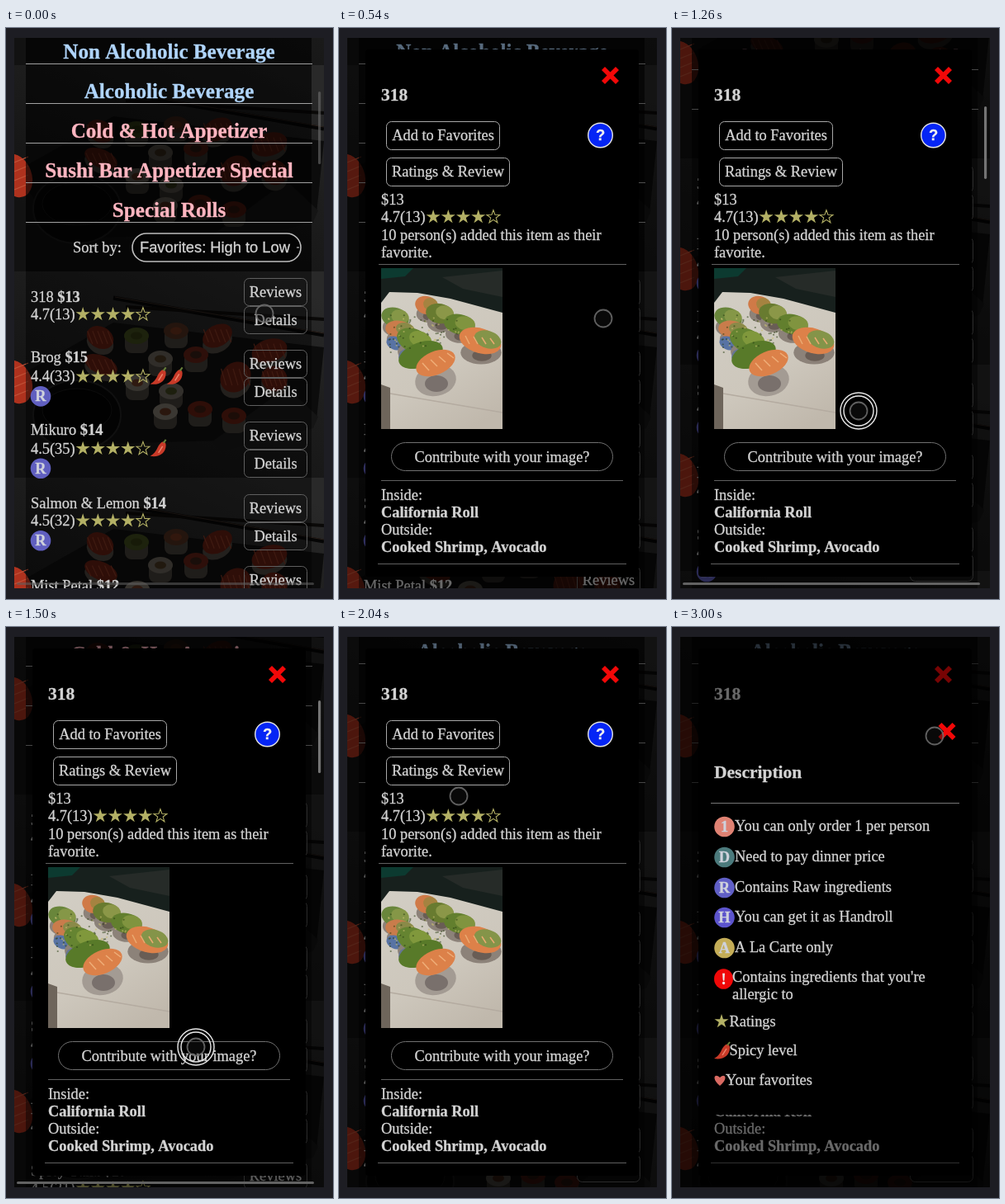
Animation of 396x692 px, one loop 3060 ms. Source, as an HTML page with a canvas:

```html
<!DOCTYPE html>
<html lang="en">
<head>
<meta charset="utf-8">
<title>Menu</title>
<style>
html, body { margin: 0; width: 100%; height: 100%; overflow: hidden; background: #1d1d23; }
canvas { display: block; width: 396px; height: 692px; }
</style>
</head>
<body>
<canvas id="stage"></canvas>
<script>
const W = 396, H = 692, LOOP = 3060, STEP = 60;
const SERIF = '"Liberation Serif", "Times New Roman", serif';
const SANS = '"Liberation Sans", Arial, sans-serif';
const GREY = '#d3d3d3', GOLD = '#b3b065';

const canvas = document.getElementById('stage');
const dpr = window.devicePixelRatio || 1;
canvas.width = W * dpr;
canvas.height = H * dpr;
let ctx = canvas.getContext('2d');

const sections = ['Non Alcoholic Beverage', 'Alcoholic Beverage', 'Cold & Hot Appetizer',
  'Sushi Bar Appetizer Special', 'Special Rolls'];
const items = [
  { name: '318', price: 13, rating: '4.7(13)' },
  { name: 'Brog', price: 15, rating: '4.4(33)', hot: 2, raw: true },
  { name: 'Mikuro', price: 14, rating: '4.5(35)', hot: 1, raw: true },
  { name: 'Salmon & Lemon', price: 14, rating: '4.5(32)', raw: true },
  { name: 'Mist Petal', price: 12, rating: '4.6(28)' },
  { name: 'Spicy Tuna', price: 13, rating: '4.5(21)', raw: true }
];
const legend = [
  ['1', '#df8273', 241, 'You can only order 1 per person'],
  ['D', '#4b7a7c', 278, 'Need to pay dinner price'],
  ['R', '#605fc6', 315, 'Contains Raw ingredients'],
  ['H', '#5c54cc', 351, 'You can get it as Handroll'],
  ['A', '#c4ad57', 388, 'A La Carte only']
];

// time, x, y
const path = [[0, 313, 346], [240, 313, 347], [540, 320, 352], [660, 318, 362], [1080, 228, 600],
  [1260, 226, 464], [1380, 226, 464], [1620, 234, 554], [1740, 236, 535], [2040, 145, 205],
  [2460, 314, 129], [2580, 318, 127], [3000, 318, 132]];
const scrollKeys = [[1080, 0], [1260, 137], [1380, 137], [1620, 47]];

const clamp = v => Math.max(0, Math.min(1, v));
const ease = v => { v = clamp(v); return v * v * (3 - 2 * v); };
const ramp = (t, a, b) => ease((t - a) / (b - a));

function random(seed) {
  return () => (seed = (seed * 16807) % 2147483647) / 2147483647;
}

function track(keys, t, col = 1) {
  for (let i = 1; i < keys.length; i++) {
    const a = keys[i - 1], b = keys[i];
    if (t <= b[0]) return a[col] + (b[col] - a[col]) * ramp(t, a[0], b[0]);
  }
  return keys[keys.length - 1][col];
}

function rect(x, y, w, h, fill) {
  ctx.fillStyle = fill;
  ctx.fillRect(x, y, w, h);
}

function box(x, y, w, h, r, stroke, fill, line = 1) {
  ctx.beginPath();
  ctx.roundRect(x, y, w, h, r);
  if (fill) { ctx.fillStyle = fill; ctx.fill(); }
  if (stroke) { ctx.strokeStyle = stroke; ctx.lineWidth = line; ctx.stroke(); }
}

function oval(x, y, rx, ry, fill, turn = 0, stroke, line = 1) {
  ctx.beginPath();
  ctx.ellipse(x, y, rx, ry, turn, 0, Math.PI * 2);
  if (fill) { ctx.fillStyle = fill; ctx.fill(); }
  if (stroke) { ctx.strokeStyle = stroke; ctx.lineWidth = line; ctx.stroke(); }
}

function poly(points, fill) {
  ctx.beginPath();
  points.forEach(p => ctx.lineTo(p[0], p[1]));
  ctx.closePath();
  ctx.fillStyle = fill;
  ctx.fill();
}

function stroke(x1, y1, x2, y2, color, width) {
  ctx.beginPath();
  ctx.moveTo(x1, y1);
  ctx.lineTo(x2, y2);
  ctx.strokeStyle = color;
  ctx.lineWidth = width;
  ctx.stroke();
}

// Draws slightly thickened text and returns its right edge.
function text(s, x, y, { size = 18.4, bold = false, color = GREY, align = 'left', face = SERIF } = {}) {
  ctx.font = (bold ? 'bold ' : '') + size + 'px ' + face;
  ctx.textAlign = align;
  ctx.fillStyle = ctx.strokeStyle = color;
  ctx.lineWidth = .3;
  ctx.fillText(s, x, y);
  ctx.strokeText(s, x, y);
  return x + ctx.measureText(s).width;
}

const rule = (x1, x2, y, color = '#606060') => rect(x1, y, x2 - x1, 1, color);

function star(x, y, filled = true) {
  ctx.beginPath();
  for (let i = 0; i < 10; i++) {
    const r = i % 2 ? 3.4 : filled ? 9 : 8.4, a = i * Math.PI / 5 - Math.PI / 2;
    ctx.lineTo(x + r * Math.cos(a), y + r * Math.sin(a));
  }
  ctx.closePath();
  ctx.fillStyle = ctx.strokeStyle = GOLD;
  ctx.lineWidth = 1.1;
  filled ? ctx.fill() : ctx.stroke();
}

function rating(label, x, base) {
  const end = text(label, x, base);
  for (let i = 0; i < 5; i++) star(end + 9.5 + i * 18.2, base - 6, i < 4);
  return end + 91;
}

function pepper(x, y) {
  ctx.beginPath();
  ctx.moveTo(x + 2, y - 7);
  ctx.bezierCurveTo(x - 3, y - 3, x - 2, y + 4, x - 11, y + 9);
  ctx.bezierCurveTo(x, y + 11, x + 8, y + 5, x + 8, y - 4);
  ctx.bezierCurveTo(x + 8, y - 9, x + 4, y - 9, x + 2, y - 7);
  ctx.fillStyle = '#c93a28';
  ctx.fill();
  stroke(x + 4, y - 3, x - 1, y + 5, '#ea8a72', 1.4);
  stroke(x + 5, y - 7, x + 8, y - 11, '#68803a', 2);
}

function badge(letter, x, y, color) {
  oval(x, y, 12.3, 12.3, color);
  text(letter, x, y + 6, { align: 'center', color: '#cfd2dc', bold: true });
}

function cross(x, y, r = 8.5) {
  stroke(x - r, y - r, x + r, y + r, '#f20808', 5.6);
  stroke(x + r, y - r, x - r, y + r, '#f20808', 5.6);
}

function button(label, x, y, w, h, base, r = 6, color = '#a8a8a8') {
  box(x + .5, y + .5, w - 1, h - 1, r, color);
  text(label, x + w / 2, base, { align: 'center' });
}

// Repeating dark sushi backdrop, 375 x 250.
function makeTile() {
  const tile = document.createElement('canvas');
  tile.width = 375 * dpr;
  tile.height = 250 * dpr;
  const main = ctx;
  ctx = tile.getContext('2d');
  ctx.scale(dpr, dpr);
  const g = ctx.createLinearGradient(300, 0, 180, 250);
  g.addColorStop(0, '#292929');
  g.addColorStop(.4, '#1e1e1e');
  g.addColorStop(1, '#121212');
  rect(0, 0, 375, 250, g);
  poly([[0, 130], [120, 62], [375, 92], [366, 180], [250, 205], [60, 210]], '#0c0c0c');
  poly([[330, 140], [368, 176], [362, 190], [250, 218], [240, 206]], '#151515');
  stroke(120, 32, 375, 77, '#050505', 5);
  stroke(135, 43, 375, 58, '#0a0908', 4);
  stroke(122, 31, 375, 75, '#2b211c', 1);
  oval(76, 174, 53, 42, '#050505', 0, '#1d1d1d', 2);
  oval(76, 168, 42, 26, '#020202', 0, '#151515', 1);

  const nigiri = (x, y, rx, ry, turn) => {
    oval(x, y + 7, rx, ry, '#403a34', turn);
    oval(x, y, rx, ry, '#54190f', turn);
    for (let i = -2; i < 3; i++) stroke(x + i * rx * .36 - 3, y - ry * .6, x + i * rx * .36 + 3, y + ry * .6, '#72301f', 1.2);
  };
  const roll = (x, y, top, core = '#241f18') => {
    box(x - 14, y - 8, 28, 24, 8, null, '#39342f');
    oval(x, y - 5, 15, 10, top);
    oval(x, y - 5, 7, 4.5, core);
  };
  nigiri(104, 80, 17, 13, .5);
  roll(148, 83, '#343e17', '#29300f');
  roll(196, 77, '#42271a', '#592a18');
  nigiri(246, 78, 19, 13, -.5);
  nigiri(309, 96, 22, 14, -.3);
  nigiri(105, 113, 21, 11, .4);
  roll(177, 111, '#57524a', '#3c2d1c');
  roll(220, 106, '#521c12', '#2d1a12');
  roll(149, 140, '#635e55', '#55301e');
  nigiri(268, 128, 20, 17, -.8);
  nigiri(315, 130, 16, 15, .5);
  roll(190, 150, '#5c574f', '#34381a');
  roll(183, 175, '#69645b', '#4d2a1a');
  roll(225, 172, '#54190f', '#32170e');
  roll(266, 180, '#54190f', '#32170e');
  oval(2, 134, 19, 27, '#ae321e', -.35);
  for (let i = 0; i < 4; i++) stroke(0, 118 + i * 11, 17, 111 + i * 11, '#c05238', 1.2);
  ctx.restore();
  ctx = main;
  return tile;
}
const tile = makeTile();

function drawItem(item, i) {
  const c = 337 + 87.4 * i, lines = item.raw ? 3 : 2;
  const nameY = lines === 2 ? c - 5 : item.hot ? c - 19 : c - 17;
  const end = text(item.name + ' ', 30, nameY);
  text('$' + item.price, end, nameY, { bold: true });
  const x = rating(item.rating, 30, lines === 2 ? c + 16 : c + 4);
  for (let k = 0; k < (item.hot || 0); k++) pepper(x + 11 + k * 20, c - 2);
  if (item.raw) badge('R', 42, c + 22, '#605fc0');
  const top = Math.round(c - 34.5);
  button('Reviews', 288, top, 77, 34, top + 23, 6, '#5f5f5f');
  button('Details', 288, top + 34, 77, 34, top + 57, 6, '#5f5f5f');
}

function drawList(scroll) {
  ctx.save();
  ctx.beginPath();
  ctx.rect(10, 12, 375, 667);
  ctx.clip();
  ctx.translate(0, -scroll);
  for (let y = -205; y < 850; y += 250) ctx.drawImage(tile, 10, y, 375, 250);
  rect(24, 0, 346, 900, 'rgba(0,0,0,.45)');
  rect(24, 0, 346, 295, 'rgba(0,0,0,.36)');
  sections.forEach((s, i) => {
    text(s, 197.5, 37 + 48 * i, { size: 25.1, bold: true, align: 'center', color: i < 2 ? '#b0d5fb' : '#ffb6c1' });
    rule(24, 371, 43 + 48 * i, '#a2a2a2');
  });
  text('Sort by:', 81, 272);
  box(153, 249, 204, 34, 17, '#bdbdbd', 'rgba(0,0,0,.5)', 1.6);
  text('Favorites: High to Low', 162, 272, { face: SANS, size: 18.3 });
  rect(352, 265, 3, 2, '#777');
  items.forEach(drawItem);
  ctx.restore();
}

function drawPhoto() {
  ctx.save();
  ctx.beginPath();
  ctx.rect(51, 291, 147, 195);
  ctx.clip();
  rect(51, 291, 147, 195, '#17201d');
  poly([[51, 291], [90, 291], [80, 301], [51, 304]], '#0c3a30');
  poly([[125, 302], [198, 294], [198, 326], [150, 316]], '#262b28');
  const g = ctx.createLinearGradient(60, 320, 160, 486);
  g.addColorStop(0, '#d2cec4');
  g.addColorStop(.6, '#cdc7bc');
  g.addColorStop(1, '#c0b8ac');
  poly([[51, 333], [61, 320], [95, 321], [135, 328], [198, 345], [198, 486], [62, 486], [51, 440]], g);
  poly([[51, 432], [62, 436], [62, 486], [51, 486]], '#6e655b');
  stroke(62, 443, 198, 466, '#b4aba0', 1.5);

  // rice body, topping and a second topping colour
  const roll = (x, y, rx, ry, a, b, turn) => {
    oval(x + 1, y + ry * .95, rx * .95, ry * .95, '#8c8279');
    oval(x + 2, y + ry * 1.2, rx * .45, ry * .45, '#695d55');
    oval(x, y, rx, ry, a, turn);
    oval(x + rx * .35, y - ry * .1, rx * .64, ry * .7, b, turn);
  };
  roll(106, 336, 14, 11, '#d07a47', '#a58340', .3);
  roll(122, 346, 17, 12, '#687b30', '#8b9748', .2);
  roll(146, 359, 19, 12, '#627f2e', '#80943f', .2);
  roll(68, 351, 17, 12, '#69863b', '#859747', .3);
  roll(74, 366, 18, 11, '#c97c4b', '#8a8a48', .2);
  oval(68, 382, 11, 8, '#5873a4', .4);
  roll(91, 379, 22, 14, '#658431', '#80983c', .4);
  roll(171, 379, 26, 15, '#dd8149', '#849449', .3);
  oval(83, 399, 11, 10, '#667694', .4);
  oval(99, 396, 28, 15, '#587a29', -.35);
  oval(117, 427, 25, 19, '#a39b93', -.2);
  oval(118, 431, 14, 10, '#79706c');
  oval(117, 406, 25, 14, '#dc8149', -.4);
  for (let i = 0; i < 4; i++) stroke(101 + i * 10, 406 - i * 4, 109 + i * 10, 415 - i * 5, '#efae78', 1.5);
  for (let i = 0; i < 4; i++) stroke(153 + i * 10, 373 + i, 158 + i * 10, 383, '#ebaa72', 1.5);
  const rnd = random(77);
  for (let i = 0; i < 70; i++) {
    const u = rnd(), v = rnd();
    oval(60 + u * 85, 346 + u * 8 + v * 48 * (1 - u * .5), 1.1, 1, i % 3 ? 'rgba(40,60,18,.55)' : 'rgba(200,190,110,.6)');
  }
  ctx.restore();
}

// Fades and settles a popup in place.
function popup(k, draw) {
  if (k <= 0) return;
  ctx.save();
  ctx.globalAlpha = k;
  const s = .96 + .04 * k;
  ctx.translate(198, 346 + 10 * (1 - k));
  ctx.scale(s, s);
  ctx.translate(-198, -346);
  draw();
  ctx.restore();
}

function drawModal() {
  box(32, 26, 331, 639, 4, null, '#000');
  cross(328.5, 57.5);
  text(items[0].name, 51, 88, { size: 21.5, bold: true });
  button('Add to Favorites', 57, 113, 138, 35, 136);
  oval(316.5, 130, 14.8, 14.8, '#0525f5', 0, '#e4e4e4', 1.4);
  text('?', 316.5, 136, { face: SANS, size: 18.4, bold: true, align: 'center', color: '#f0f0f0' });
  button('Ratings & Review', 57, 157, 150, 35, 180);
  text('$13', 51, 214);
  rating(items[0].rating, 51, 235);
  text('10 person(s) added this item as their', 51, 257);
  text('favorite.', 51, 278);
  rule(48, 348, 286);
  drawPhoto();
  button('Contribute with your image?', 63, 502, 269, 35, 526, 17, '#707070');
  rule(51, 344, 548);
  text('Inside:', 51, 572);
  text('California Roll', 51, 593, { bold: true });
  text('Outside:', 51, 614);
  text('Cooked Shrimp, Avocado', 51, 635, { bold: true });
  rule(47, 348, 649);
}

function drawLegend() {
  box(32, 100, 331, 491, 3, null, '#000');
  cross(333, 126.5);
  text('Description', 51, 183, { size: 21.5, bold: true });
  rule(47, 348, 213, '#757575');
  for (const [letter, color, y, label] of legend) {
    badge(letter, 63.5, y + 1, color);
    text(label, 76, y + 5.5);
  }
  oval(62.5, 426.5, 11.5, 12.3, '#f00808');
  text('!', 62.5, 433, { bold: true, align: 'center', color: '#eee' });
  text("Contains ingredients that you're", 73, 430);
  text('allergic to', 73, 451);
  star(60, 478);
  text('Ratings', 69.5, 484);
  pepper(62, 514);
  text('Spicy level', 69.5, 519);
  ctx.beginPath();
  ctx.moveTo(58, 556);
  ctx.bezierCurveTo(47, 547, 52, 540, 58, 546);
  ctx.bezierCurveTo(64, 540, 69, 547, 58, 556);
  ctx.fillStyle = '#d96a62';
  ctx.fill();
  text('Your favorites', 65, 555);
}

function drawBars(t, scroll) {
  const a = t < 1080 ? .55 * (1 - ramp(t, 120, 420)) : ramp(t, 1080, 1200) * (1 - ramp(t, 1760, 1980));
  if (a <= 0) return;
  ctx.globalAlpha = a;
  box(378, 77 + scroll * .131, 3.2, 88, 1.6, null, '#747474');
  box(13, 672, 360, 3, 1.5, null, '#626262');
  ctx.globalAlpha = 1;
}

function drawCursor(t) {
  const x = track(path, t), y = track(path, t, 2);
  const down = (t >= 180 && t < 300) || (t >= 1080 && t < 1640) || (t >= 2640 && t < 2760);
  if (down) {
    oval(x, y, 22, 22, null, 0, '#e8e8e8', 1.4);
    oval(x, y, 18, 18, null, 0, '#e8e8e8', 1.4);
  }
  oval(x, y, 10.5, 10.5, 'rgba(20,20,20,.45)', 0, 'rgba(112,112,112,.85)', 1.8);
}

function draw(t) {
  const scroll = track(scrollKeys, t);
  const open = ramp(t, 300, 520), help = ramp(t, 2730, 2960);
  ctx.setTransform(dpr, 0, 0, dpr, 0, 0);
  rect(0, 0, W, H, '#1d1d23');
  drawList(scroll);
  const dim = .5 * open + .06 * ramp(t, 540, 720);
  rect(10, 12, 375, 667, `rgba(0,0,0,${dim})`);
  popup(open, drawModal);
  rect(10, 12, 375, 667, `rgba(0,0,0,${.5 * help})`);
  popup(help, drawLegend);
  drawBars(t, scroll);
  drawCursor(t);
}

const start = performance.now();
function tick() {
  const t = (performance.now() - start) % LOOP;
  draw(Math.floor(t / STEP) * STEP);
  requestAnimationFrame(tick);
}
tick();
</script>
</body>
</html>
```
